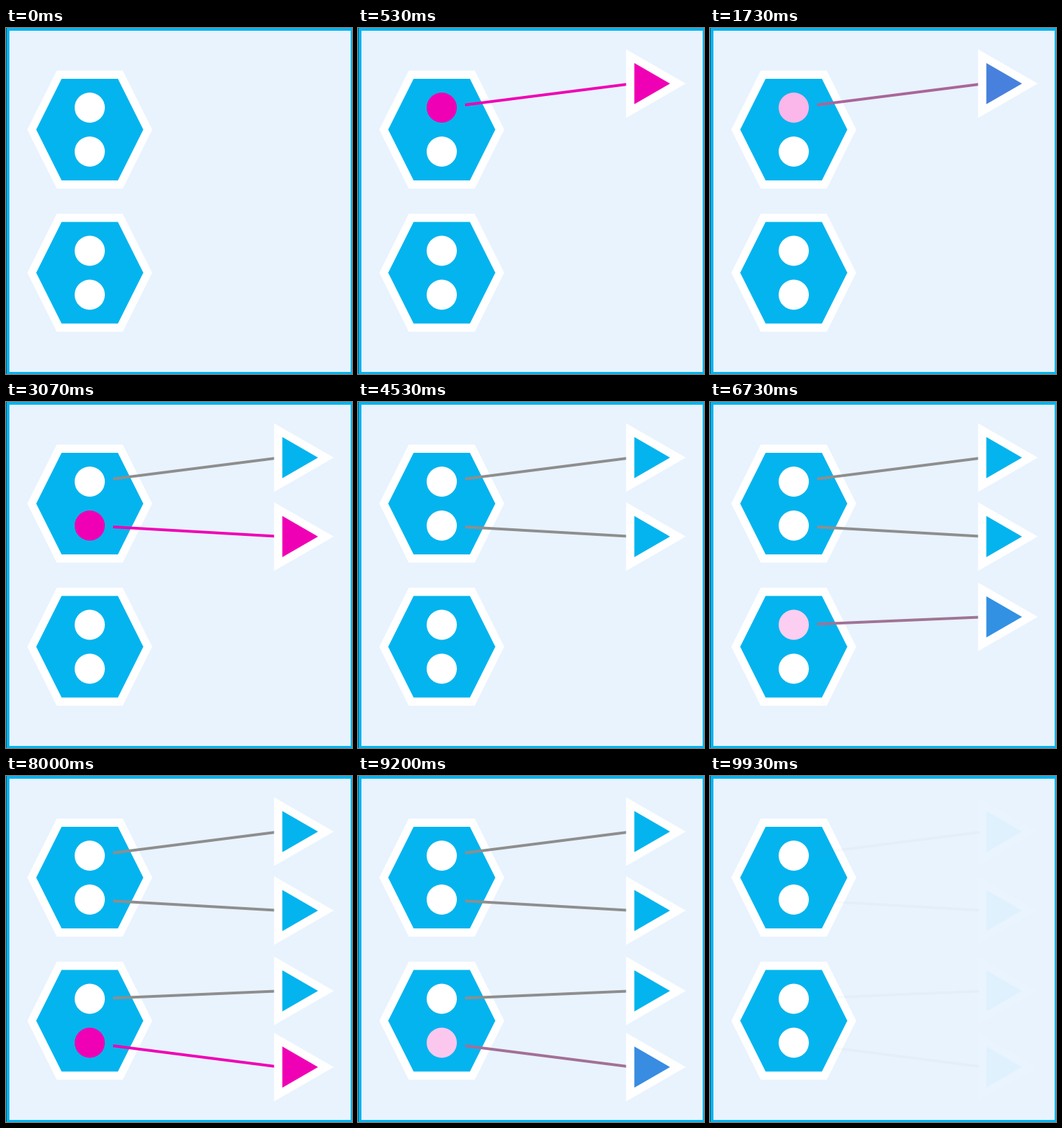
Recreate the animation shown at these times as an HTML page. Size 504 px wide and 504 px high, loop 10000 ms.

```html
<!DOCTYPE html>
<html lang="en">
<head>
<meta charset="utf-8">
<title>Hexagon links</title>
<style>
  html, body { margin: 0; width: 100%; height: 100%; overflow: hidden; background: #04b4ee; }
  svg { display: block; width: 100vw; height: 100vh; }
</style>
</head>
<body>
<svg id="stage" viewBox="0 0 504 504">
  <rect width="504" height="504" fill="#04b4ee"/>
  <path d="M5 4H502V501H5Z" fill="#e8f3fe"/>
  <path d="M.5 0V504" stroke="#000" stroke-dasharray="1 1"/>
</svg>
<script>
const LOOP = 10000, STEP = 1000 / 15, FADE = 496;
const OUT_START = 9757, OUT_TIME = 235;
const BLUE = [4, 180, 238], PINK = [240, 0, 180], GREY = [142, 142, 142], WHITE = [255, 255, 255];

// Times when each link lights up (on) and settles (off), with its geometry.
const LINKS = [
  { on: 35, off: 1523, dot: 116, from: 112, to: 82, tip: 81 },
  { on: 2515, off: 4003, dot: 180, from: 182, to: 195.5, tip: 196 },
  { on: 4995, off: 6483, dot: 324.5, from: 323.5, to: 313.5, tip: 313 },
  { on: 7475, off: 8963, dot: 388.5, from: 393, to: 423, tip: 424 }
];

const stage = document.getElementById('stage');

function add(tag, attrs) {
  const el = document.createElementNS(stage.namespaceURI, tag);
  for (const key in attrs) el.setAttribute(key, attrs[key]);
  return stage.appendChild(el);
}

function hexagon(y) {
  add('path', { d: `M31 ${y}l43-86h96l43 86l-43 86h-96Z`, fill: '#fff' });
  add('path', { d: `M44 ${y}l37-74h82l37 74l-37 74h-82Z`, fill: '#04b4ee' });
}

hexagon(148);
hexagon(356.5);

for (const link of LINKS) {
  link.circle = add('circle', { cx: 122, cy: link.dot, r: 22 });
  link.line = add('path', { d: `M156 ${link.from}L392 ${link.to}`, 'stroke-width': 4 });
  link.frame = add('path', { d: `M390.5 ${link.tip - 50}l87 50l-87 50Z`, fill: '#fff' });
  link.arrow = add('path', { d: `M402.5 ${link.tip - 30}l52 30l-52 30Z` });
}

// Cubic bezier (.25, .1, .25, 1)
function ease(x) {
  if (x <= 0) return 0;
  if (x >= 1) return 1;
  let lo = 0, hi = 1, u = 0.5;
  for (let i = 0; i < 24; i++) {
    u = (lo + hi) / 2;
    const bx = 0.75 * u * (1 - u) + u * u * u;
    if (bx < x) lo = u; else hi = u;
  }
  return 0.3 * u * (1 - u) ** 2 + 3 * u * u * (1 - u) + u ** 3;
}

const mix = (a, b, k) => `rgb(${a.map((v, i) => Math.round(v + (b[i] - v) * k))})`;

function render(t) {
  const out = 1 - ease((t - OUT_START) / OUT_TIME);
  for (const { on, off, circle, line, frame, arrow } of LINKS) {
    const shown = ease((t - on) / FADE);
    const lit = shown - ease((t - off) / FADE);
    circle.setAttribute('fill', mix(WHITE, PINK, lit));
    line.setAttribute('stroke', mix(GREY, PINK, lit));
    arrow.setAttribute('fill', mix(BLUE, PINK, lit));
    for (const el of [line, frame, arrow]) el.setAttribute('opacity', shown * out);
  }
}

const start = performance.now();

function tick() {
  const t = (performance.now() - start) % LOOP;
  render(Math.floor((t + 4) / STEP) * STEP % LOOP);
  requestAnimationFrame(tick);
}

tick();
</script>
</body>
</html>
```
